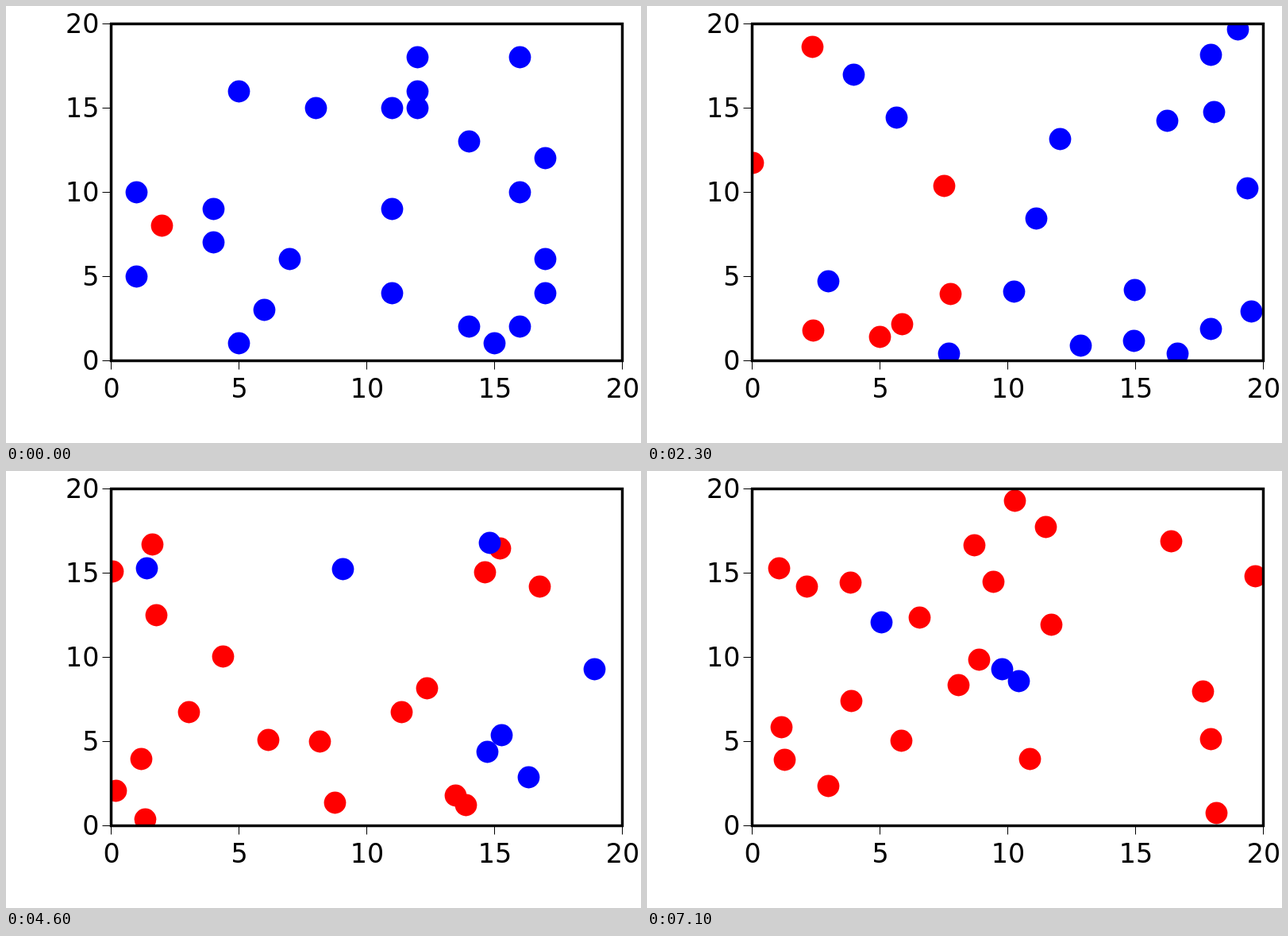
Write an HTML page with a canvas that moves like this. It is 800 px wide and 550 px high and loops after 7200 ms.

```html
<!DOCTYPE html>
<html lang="en">
<head>
<meta charset="utf-8">
<title>Contagion scatter</title>
<style>
  html, body { margin: 0; width: 100%; height: 100%; overflow: hidden; background: #fff; }
  canvas { display: block; }
</style>
</head>
<body>
<canvas id="stage" width="800" height="550"></canvas>
<script>
const ctx = document.getElementById('stage').getContext('2d');
const LEFT = 132.5, TOP = 22.5, WIDTH = 644, HEIGHT = 424;
const BOTTOM = TOP + HEIGHT;
const STEP_MS = 100, LAST = 71, RADIUS = 13.89;
const CARRIERS = 22;
const balls = [];

// A ball drifts in straight lines from its start, over one or two bends, to its end.
// Points lie in an unfolded plane: whatever passes a wall is mirrored back.
function ball(start, bend, ...rest) {
  const times = rest.length > 1 ? [0, 23, 52, LAST] : [0, 23, LAST];
  balls.push({ points: [start, bend, ...rest], times });
}

// Balls are listed in the order in which they catch the infection.
ball([64, 170], [77, 38], [-96, 50]);
ball([-129, 191], [1, 249], [65, 381], [34, 324]);
ball([32, 106], [242, 220], [760, 490]);
ball([-32, 212], [76, 395], [37, 124]);
ball([-129, 149], [-250, 84], [350, 84]);
ball([161, 22], [189, 46], [129, 257], [-69, 547]);
ball([193, 64], [161, 30], [289, 126], [260, 177]);
ball([354, 530], [128, 360], [-31, 309], [280, 495]);
ball([451, 43], [624, 217], [339, 162], [286, 209]);
ball([386, -339], [330, -87], [478, 55], [634, 314]);
ball([386, 382], [482, 89], [421, 25], [585, 16]);
ball([354, 85], [414, 19], [248, 31], [-41, 83]);
ball([-161, -339], [-96, -100], [-29, 16], [125, 157]);
ball([225, 128], [248, -9], [185, 138], [304, 307]);
ball([258, 318], [388, 279], [360, 108], [578, -109]);
ball([354, 657], [182, 306], [76, 101], [188, 107]);
ball([837, 276], [765, 302], [394, 324], [124, 306]);
ball([773, 212], [706, 313], [497, 298], [370, 376]);
ball([547, 255], [676, 431], [425, 337], [211, 262]);
ball([386, -318], [481, -25], [642, 255], [377, 253]);
ball([-515, 43], [-358, 179], [37, 362], [331, 409]);
ball([483, 22], [536, 9], [524, 74], [568, 169]);
ball([773, 382], [710, 385], [-163, 256]);
ball([547, 128], [629, 62], [456, 127], [315, 197]);
ball([547, 85], [578, 40], [447, 107], [336, 182]);

// A steady spread at first, then one new case per step.
function infectedAt(index) {
  return index < CARRIERS ? Math.min(3.4 * index - 0.6, 29 + index) : Infinity;
}

function fold(value, size) {
  const v = Math.abs(value) % (2 * size);
  return v > size ? 2 * size - v : v;
}

function place({ points, times }, step) {
  let i = 0;
  while (i < times.length - 2 && step >= times[i + 1]) i++;
  const part = (step - times[i]) / (times[i + 1] - times[i]);
  const [x, y] = points[i].map((from, axis) =>
    Math.round(from + (points[i + 1][axis] - from) * part));
  return [LEFT + fold(x, WIDTH), BOTTOM - fold(y, HEIGHT)];
}

function drawBalls(step) {
  ctx.save();
  ctx.beginPath();
  ctx.rect(LEFT, TOP, WIDTH, HEIGHT);
  ctx.clip();
  balls.forEach((item, index) => {
    const [x, y] = place(item, step);
    ctx.fillStyle = step >= infectedAt(index) ? '#f00' : '#00f';
    ctx.beginPath();
    ctx.arc(x, y, RADIUS, 0, 2 * Math.PI);
    ctx.fill();
  });
  ctx.restore();
}

function drawAxes() {
  ctx.strokeStyle = ctx.fillStyle = '#000';
  ctx.lineWidth = 3.47;
  ctx.strokeRect(LEFT, TOP, WIDTH, HEIGHT);
  ctx.lineWidth = 1;
  ctx.font = '33.33px "DejaVu Sans", sans-serif';
  ctx.beginPath();
  for (let n = 0; n <= 20; n += 5) {
    const x = LEFT + n / 20 * WIDTH;
    const y = BOTTOM - n / 20 * HEIGHT;
    ctx.moveTo(x, BOTTOM);
    ctx.lineTo(x, BOTTOM + 11);
    ctx.moveTo(LEFT, y);
    ctx.lineTo(LEFT - 11, y);
    ctx.textAlign = 'center';
    ctx.fillText(n, x + 0.5, 493);
    ctx.textAlign = 'right';
    ctx.fillText(n, 117.5, y + 11.5);
  }
  ctx.stroke();
}

function render() {
  const step = Math.floor(performance.now() / STEP_MS) % (LAST + 1);
  ctx.fillStyle = '#fff';
  ctx.fillRect(0, 0, 800, 550);
  drawBalls(step);
  drawAxes();
  requestAnimationFrame(render);
}
render();
</script>
</body>
</html>
```
